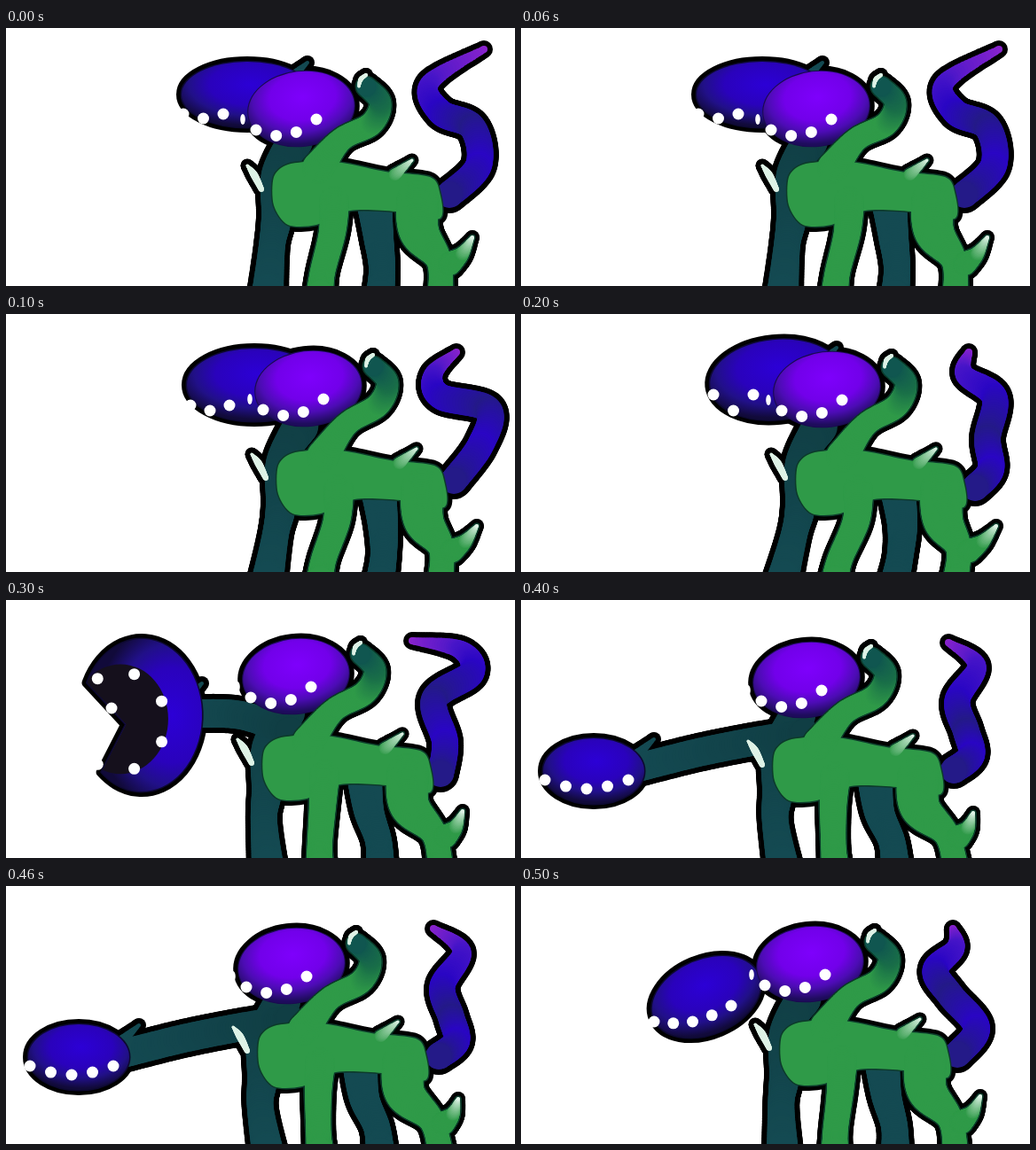
An HTML page with a canvas that plays this animation: 574x291 px, repeating every 600 ms.

```html
<!DOCTYPE html>
<html lang="en">
<head>
<meta charset="utf-8">
<title>Two-headed creature</title>
<style>
  html, body { margin: 0; width: 100%; height: 100%; overflow: hidden; background: #fff; }
  canvas { display: block; width: 574px; height: 291px; }
</style>
</head>
<body>
<canvas id="stage" width="574" height="291"></canvas>
<script>
const ctx = document.getElementById('stage').getContext('2d');
const STEP = 100, EDGE = 6;
const GREEN = [47, 154, 72], TEAL = [20, 74, 82], DEEP = [16, 62, 68], PALE = [222, 242, 230];
const VIOLET = [140, 36, 205], BLUE = [42, 6, 196], NAVY = [36, 26, 136];

// Offsets of head and body, key points of the tail,
// far head (x, y, rx, ry, turn) and its teeth (from, to, count, bow)
const POSES = [
  { head: [0, 0], body: [0, 0], tail: '539,24 478,62 490,95 526,112 533,155 500,188',
    far: [272, 75, 74, 37, 0], teeth: [200, 97, 245, 97, 3, 5] },
  { head: [8, -7], body: [5, 3], tail: '508,43 482,68 490,93 544,108 535,148 505,188',
    far: [280, 80, 76, 41, 0], teeth: [208, 103, 252, 103, 3, 6] },
  { head: [12, -6], body: [10, 3], tail: '505,43 500,68 534,94 526,140 530,175 512,196',
    far: [288, 74, 75, 45, -0.1], teeth: [217, 91, 262, 91, 3, 18] },
  { head: [-6, -5], body: [-11, 2], tail: '458,46 512,56 525,82 483,112 495,160 490,196',
    far: [153, 130, 68, 86, 0], open: true, neck: '215,128 265,130 320,148' },
  { head: [-11, -1], body: [-16, 4], tail: '482,48 514,74 492,113 502,148 508,175 488,192',
    far: [82, 193, 57, 37, 0], teeth: [27, 203, 121, 203, 5, 10], neck: '136,188 200,172 260,160 320,150' },
  { head: [-7, -3], body: [-8, 1], tail: '487,48 490,70 467,95 485,124 514,160 492,190',
    far: [209, 125, 64, 42, -0.4], teeth: [150, 153, 237, 135, 5, 9] }
];

const pts = (text) => text.split(' ').map(p => p.split(',').map(Number));
const clamp = (v) => Math.max(0, Math.min(1, v));
const mix = (a, b, t) => a + (b - a) * t;
const rgb = (c) => `rgb(${c.map(Math.round)})`;

// Colour at t along evenly spaced stops
function blend(stops, t) {
  const s = t * (stops.length - 1), i = Math.max(0, Math.min(Math.floor(s), stops.length - 2));
  const next = stops[i + 1] || stops[i];
  return rgb(stops[i].map((c, j) => mix(c, next[j], s - i)));
}

// Top follows the head, trunk follows the body, feet stay planted
function bend(list, { head, body }) {
  return list.map(([x, y, ...r]) => {
    const up = clamp((150 - y) / 50), hold = clamp((291 - y) / 55);
    return [x + mix(body[0], head[0], up) * hold, y + mix(body[1], head[1], up) * hold, ...r];
  });
}

function dot(x, y, rx, ry = rx) {
  ctx.beginPath();
  ctx.ellipse(x, y, rx, ry, 0, 0, 7);
  ctx.fill();
}

// Each shape is a function: grown and flat for edges, or in its own colours

// A tapering stroke through points x, y, radius
function limb(p, ...stops) {
  return (grow = 0, flat) => {
    const last = p.length - 1, sub = 20;
    for (let s = 0; s <= last * sub; s++) {
      const i = Math.min(Math.floor(s / sub), last - 1), t = s / sub - i;
      const [a, b, c, d] = [p[Math.max(i - 1, 0)], p[i], p[i + 1], p[Math.min(i + 2, last)]];
      const [x, y, r] = b.map((v, j) => v + 0.5 * t * (c[j] - a[j] +
        t * (2 * a[j] - 5 * v + 4 * c[j] - d[j] + t * (3 * (v - c[j]) + d[j] - a[j]))));
      ctx.fillStyle = flat || blend(stops, s / (last * sub));
      dot(x, y, Math.max(0.5, r + grow));
    }
  };
}

// A rounded closed form through its points
function blob(p, color) {
  const path = new Path2D(), k = 0.14;
  const at = (i) => p[(i + p.length) % p.length];
  path.moveTo(...p[0]);
  p.forEach((b, i) => {
    const a = at(i - 1), c = at(i + 1), d = at(i + 2);
    path.bezierCurveTo(b[0] + (c[0] - a[0]) * k, b[1] + (c[1] - a[1]) * k,
      c[0] - (d[0] - b[0]) * k, c[1] - (d[1] - b[1]) * k, c[0], c[1]);
  });
  path.closePath();
  return (grow = 0, flat) => {
    ctx.fillStyle = ctx.strokeStyle = flat || rgb(color);
    ctx.fill(path);
    ctx.lineWidth = grow * 2;
    if (grow) ctx.stroke(path);
  };
}

// An oval with a glowing lobe that darkens towards the jaw
function skull([x, y, rx, ry, turn], colors, open) {
  return (grow = 0, flat) => {
    ctx.save();
    ctx.translate(x, y);
    ctx.rotate(turn);
    ctx.scale(rx, ry);
    ctx.beginPath();
    if (open) {
      ctx.arc(0, 0, 1, -2.7, 2.3);
      ctx.lineTo(-0.26, 0.12);
    } else ctx.arc(0, 0, 1, 0, 7);
    ctx.closePath();
    if (!flat) {
      const gx = open ? 0.5 : 0.05, gy = open ? 0 : -0.3;
      const glow = ctx.createRadialGradient(gx, gy, 0, gx, gy, 1.25);
      colors.forEach((c, i) => glow.addColorStop([0, 0.5, 0.75, 1][i], c));
      ctx.fillStyle = glow;
      ctx.fill();
      if (open) {
        ctx.clip();
        ctx.fillStyle = '#15101c';
        dot(-0.35, 0.05, 0.79, 0.72);
      }
    }
    ctx.restore();
    if (flat) {
      ctx.fillStyle = ctx.strokeStyle = flat;
      ctx.lineWidth = grow * 2;
      ctx.fill();
      ctx.stroke();
    }
  };
}

function toothRow(x0, y0, x1, y1, count, bow) {
  for (let i = 0; i < count; i++) {
    const t = i / (count - 1);
    dot(mix(x0, x1, t), mix(y0, y1, t) + bow * Math.sin(Math.PI * t), 6.5);
  }
}
function toothRing(x, y) {
  for (let a = -2.1; a < 2.2; a += 0.84) dot(x - 24 + 51 * Math.cos(a), y + 7 + 56 * Math.sin(a), 6.5);
  dot(x - 34, y - 8, 6.5);
}

function tail(text) {
  const list = pts(text), last = list.length - 1;
  const radius = (t) => 4 + 11 * Math.sin(Math.min(1, 2 * t) * Math.PI / 2);
  return limb(list.map((p, i) => [...p, radius(i / last)]), VIOLET, [72, 22, 200], BLUE, NAVY, BLUE, NAVY);
}

function draw(pose) {
  const { head: [hx, hy], far: [fx, fy] } = pose;
  const part = (text, ...colors) => limb(bend(pts(text), pose), ...colors);

  const back = [
    tail(pose.tail),
    part('326,128,20 304,165,16 305,212,17 300,245,15 295,300,18', DEEP, TEAL),
    part('415,195,20 420,235,17 424,270,15 422,300,16', TEAL),
    limb([[fx + 45, fy - 15, 7], [fx + 68, fy - 36, 2]], TEAL)
  ];
  if (pose.neck) back.push(limb(pts(pose.neck).map(p => [...p, 16]), TEAL, DEEP));
  const spike = part('272,155,1.5 280,166,4 288,182,3', PALE);
  const far = skull(pose.far, ['#2c00d6', '#2a02bc', '#211088', '#110a3a'], pose.open);
  const near = skull([333 + hx, 91 + hy, 60, 42, -0.12], ['#7e00fc', '#7200ea', '#4c0cb4', '#1e0c5c']);
  const front = [
    blob(bend(pts('302,200 302,168 318,154 355,150 385,153 428,162 478,168 489,185 489,215 ' +
      '440,207 388,206 350,222 318,222'), pose), GREEN),
    part('370,195,17 368,230,15 357,275,14 354,300,15', GREEN),
    part('464,195,24 466,230,22 488,262,14 490,300,14', GREEN),
    part('500,266,13 514,255,8 526,236,2', GREEN, GREEN, PALE),
    part('438,166,7 458,149,1.5', GREEN, PALE),
    part('352,158,18 378,126,13 412,108,13 422,84,12 406,66,11', GREEN, GREEN, GREEN, [26, 112, 72], [16, 86, 80])
  ];
  const crest = part('406,53,2 400,58,2.5 398,66,1.5', PALE);

  ctx.fillStyle = '#fff';
  ctx.fillRect(0, 0, 574, 291);
  ctx.lineJoin = ctx.lineCap = 'round';

  for (const shape of [...back, spike, far, near, ...front, crest]) shape(EDGE, '#000');
  back.forEach(shape => shape());
  spike();
  far(1.5, '#0c0830');
  far();
  near(1, '#1a0a50');
  near();
  front.forEach(shape => shape(1.5, '#0c3a2a'));
  front.forEach(shape => shape());
  crest();

  ctx.fillStyle = '#fff';
  if (pose.open) toothRing(fx, fy);
  else toothRow(...pose.teeth);
  toothRow(282 + hx, 115 + hy, 350 + hx, 103 + hy, 4, 12);
  dot(267 + hx, 103 + hy, 2.8, 6);
}

let shown = -1;
function tick() {
  const now = Math.floor(performance.now() / STEP) % POSES.length;
  if (now !== shown) draw(POSES[shown = now]);
  requestAnimationFrame(tick);
}
tick();
</script>
</body>
</html>
```
